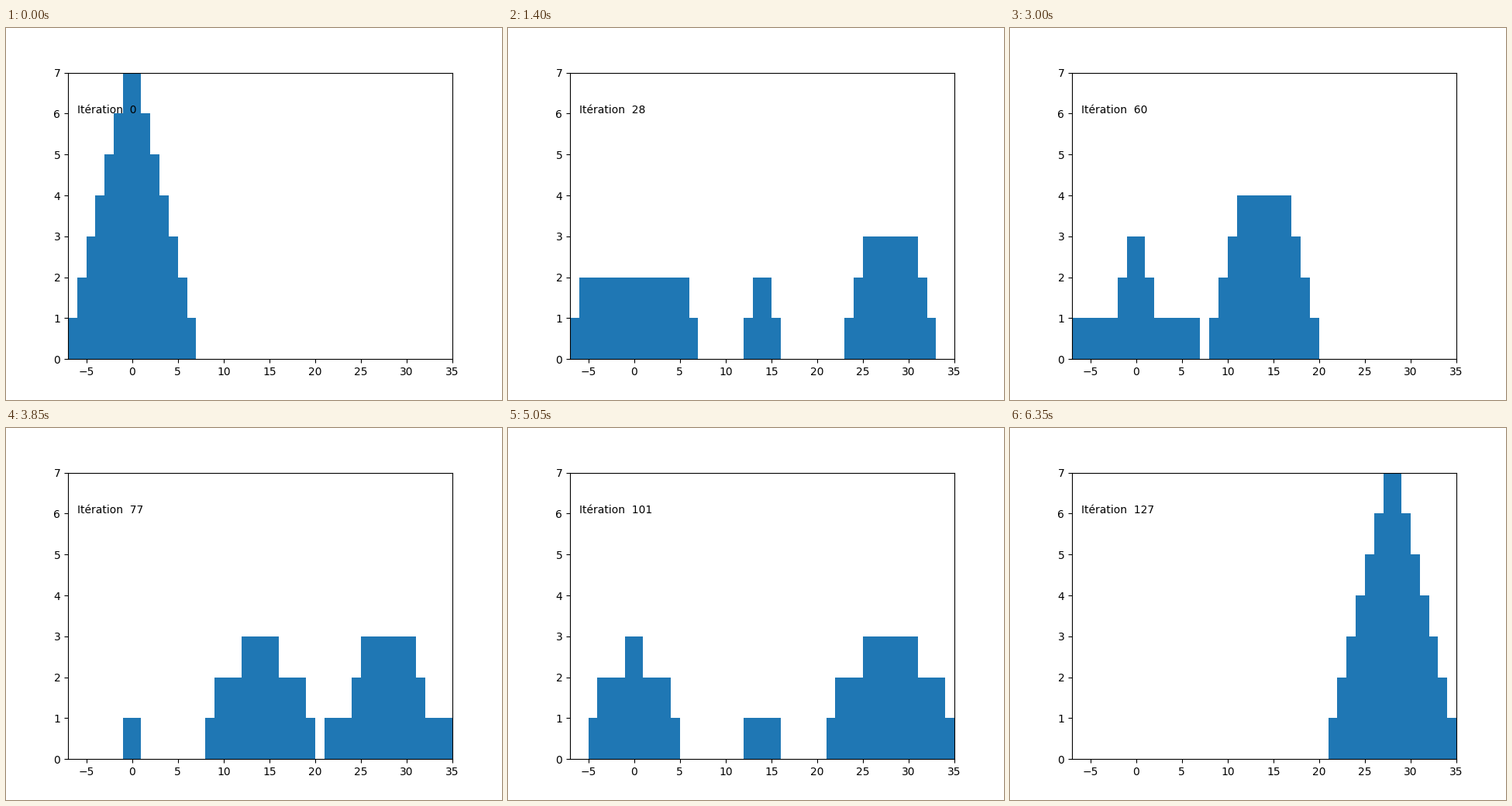
Animation, 640 px wide and 480 px high, one loop 6400 ms. Source, as a matplotlib script:

```python
import matplotlib.pyplot as plt
from matplotlib.animation import FuncAnimation

N = 7                 # number of discs
GAP = 2 * N           # distance between pegs
FRAMES = 2 ** N
INTERVAL = 50         # ms


def peg_of(disc, step):
    """Peg (0-2) holding a disc after the given number of moves."""
    moves = (step + 2 ** (disc - 1)) // 2 ** disc
    direction = -1 if (N - disc) % 2 == 0 else 1
    return direction * moves % 3


fig, ax = plt.subplots(figsize=(6.4, 4.8), dpi=100)
ax.set_xlim(-N, 5 * N)
ax.set_ylim(0, N)

sizes = range(1, N + 1)
discs = dict(zip(sizes, ax.bar([0] * N, 1, width=[2 * d for d in sizes],
                               color="#1f77b4")))
label = ax.text(1 - N, N - 1, "", fontsize=10, color="black")


def update(step):
    heights = [0, 0, 0]
    for d in reversed(sizes):
        peg = peg_of(d, step)
        discs[d].set_xy((GAP * peg - d, heights[peg]))
        heights[peg] += 1
    label.set_text(f"Itération  {step}")
    return [*discs.values(), label]


anim = FuncAnimation(fig, update, frames=FRAMES, interval=INTERVAL,
                     init_func=lambda: update(0), repeat=True, repeat_delay=0)
plt.show()
```
